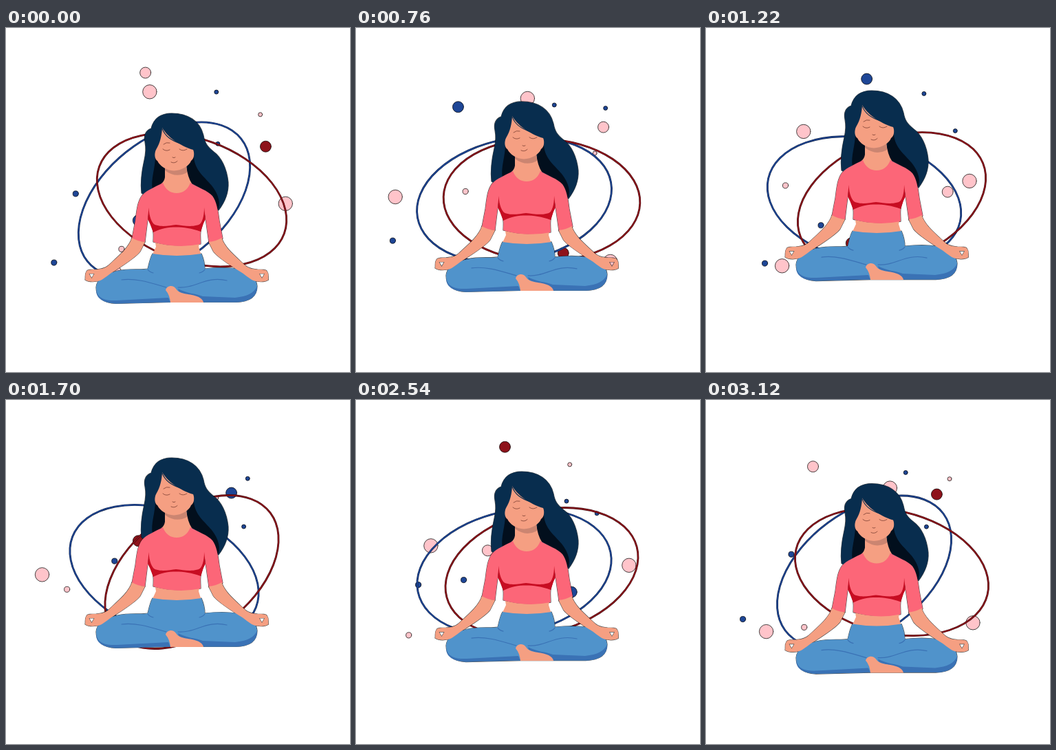
Write an HTML page with a canvas that moves like this. It is 500 px wide and 500 px high and loops after 3.14 s.

```html
<!DOCTYPE html>
<html lang="en">
<head>
<meta charset="utf-8">
<title>Meditation</title>
<style>
html, body { margin: 0; width: 100%; height: 100%; overflow: hidden; background: #fff; }
canvas { display: block; width: 500px; height: 500px; }
</style>
</head>
<body>
<canvas id="c" width="500" height="500"></canvas>
<script>
const ctx = document.getElementById('c').getContext('2d');
const LOOP = 3140, PERIOD = 3400, TAU = Math.PI * 2, DEG = Math.PI / 180;
const SKIN = '#f59f82', HAIR = '#082d4e', SHIRT = '#fc6678', CRIMSON = '#c70d22';
const JEANS = '#5093cb', DENIM = '#3a72b5', PINK = '#ffc4ca', BLUE = '#1e4696', RED = '#8e131b';

// Orbit knots: phase in ms, x, y
const orbit = [
  [0, 192, 280], [250, 191, 219], [320, 192, 205], [760, 148, 115], [830, 155, 97],
  [1110, 202, 65], [1220, 233, 74], [1700, 327, 135], [1870, 359, 144], [2020, 377, 172],
  [2140, 377, 210], [2330, 351, 238], [2540, 313, 279], [2780, 301, 327], [2900, 277, 347],
  [3120, 224, 328], [3240, 211, 313]
];
const N = orbit.length;

function knot(i) {
  const k = orbit[(i + N) % N];
  return [k[0] + Math.floor(i / N) * PERIOD, k[1], k[2]];
}

function slope(i, axis) {
  const a = knot(i - 1), b = knot(i), c = knot(i + 1);
  const h0 = b[0] - a[0], h1 = c[0] - b[0];
  return ((b[axis] - a[axis]) / h0 * h1 + (c[axis] - b[axis]) / h1 * h0) / (h0 + h1);
}

function orbitAt(phase) {
  const p = ((phase % PERIOD) + PERIOD) % PERIOD;
  let i = N - 1;
  while (orbit[i][0] > p) i--;
  const a = knot(i), b = knot(i + 1), h = b[0] - a[0], u = (p - a[0]) / h;
  const u2 = u * u, u3 = u2 * u;
  return [1, 2].map(k =>
    (2 * u3 - 3 * u2 + 1) * a[k] + (u3 - 2 * u2 + u) * h * slope(i, k) +
    (3 * u2 - 2 * u3) * b[k] + (u3 - u2) * h * slope(i + 1, k));
}

// Each group follows the same orbit, placed by anchor, scale, angle and flip
const lags = [0, 1380, 2290];
const groups = [
  { x: 148.4, y: 115, s: 1, a: 0, flip: 1, r: 8, fills: [BLUE, RED, PINK] },
  { x: 288.2, y: 112, s: 0.35, a: -4.4, flip: 1, r: 3, fills: [BLUE, PINK, BLUE] },
  { x: 369.4, y: 339.6, s: 1.247, a: 251, flip: -1, r: 10.2, fills: [PINK, PINK, PINK] },
  { x: 53.4, y: 309, s: 0.488, a: 20.2, flip: -1, r: 4.1, fills: [BLUE, PINK, BLUE] }
];

function drawDots(t) {
  for (const g of groups) {
    const cos = Math.cos(g.a * DEG) * g.s, sin = Math.sin(g.a * DEG) * g.s;
    g.fills.forEach((fill, i) => {
      const [px, py] = orbitAt(t - lags[i]);
      const dx = px - 148, dy = (py - 115) * g.flip;
      ctx.beginPath();
      ctx.arc(g.x + dx * cos - dy * sin, g.y + dx * sin + dy * cos, g.r, 0, TAU);
      ctx.fillStyle = fill;
      ctx.fill();
      ctx.strokeStyle = 'rgba(0,0,0,.8)';
      ctx.lineWidth = 0.9;
      ctx.stroke();
    });
  }
}

const wave = (t, peak) => Math.cos((t - peak) / PERIOD * TAU);

function drawRing(x, angle, color, edge) {
  ctx.beginPath();
  ctx.ellipse(x, 250, 142.9, 89, angle * DEG, 0, TAU);
  ctx.strokeStyle = edge;
  ctx.lineWidth = 2.8;
  ctx.stroke();
  ctx.strokeStyle = color;
  ctx.lineWidth = 1.7;
  ctx.stroke();
}

const P = d => new Path2D(d);
const hair = P('M241 124C222 124 214 134 211 146C203 149 200 156 202 166C204 176 203 183 201 192C198 205 195 222 197 240L215 250L300 262L309 265C318 253 324 240 323 224C321 204 313 188 302 180C292 172 289 167 287 156C282 135 264 124 241 124Z');
const hairShade = P('M271 180C263 192 260 208 267 224L290 237C300 244 304 255 308 265C312 256 310 243 299 229C287 215 275 207 273 188ZM217 187C217 204 210 220 213 235L233 226L231 204Z');
const neck = P('M231 200L231 217Q230 223 226 226Q236 243 249 242Q262 241 270 226Q264 217 262 200Z');
const neckShade = P('M231 200L231 207Q247 219 263 210L262 200Z');
const face = P('M227 145C226.500 156 224 167 218.500 176C215 182 216 191 220 193C224 201 233 207 244 207.500C255 207 266 201 269 193C274 190 274 181 272 177C258 173 237 162 227 145Z');
const strand = P('M227 146C231 158 241 164 254 168');
const features = P('M228 176Q232.500 180 238 177M252 176Q257 180 263 176M229 169Q233 165.500 238 167M242 188Q244 189.500 246 188M240 195Q245 197.500 249 193.500');
const torso = P('M228 225C217 231 204 236 198 243C191 252 190 265 188 280L183 306Q191 311 202 311L207 270L211 285C216 297 214 303 214 311Q248 321 283 314C283 303 281 298 286 284L289 270L295 312Q306 311 315 306L310 280C308 264 306 252 300 244C293 236 279 232 268 225Q262 240 248 240Q234 240 228 225Z');
const bust = P('M211 283C222 291 237 287 247 286C259 287 274 291 286 283L283 296C270 291 258 289.500 247 289.500C236 289.500 226 291 214 297Z');
const armpit = P('M207.500 261C208 275 212 283 217 287L214 297L209 284L206 278ZM288 261C288 275 285 283 280 287L283 296L287 284L290 278Z');
const belly = P('M217 312Q248 320 281 313L280 318L284 331Q248 338 212 331L218 318Z');
const arm = P('M183 305C179 319 163 332 149 345C142 351 136 350 131 351C124 351 118 351 117 354C114 358 116 362 115 366C121 370 131 369 137 367C144 364 150 357 158 353C172 344 190 332 195 325L202 311Q191 310 183 305ZM120.500 357L128.500 357L124.500 364Z');
const jeans = P('M213 328Q248 334 284 328C287 335 289 343 289 350C306 348 326 348 341 351C355 355 364 364 365 375C365 391 354 398 334 398.500L286 398.500L239 398.500L160 400.500C140 399.500 131 391 131 377C132 364 145 357 162 353C180 349 195 352 206 350C208 343 209 335 213 328Z');
const jeansShade = P('M131 381C134 394 145 396.500 161 396L236 392L239 398.500L160 400.500C141 399.500 131 393 131 381ZM250 379C263 386 276 386 286 390L333 392C351 390 361 385 365 375C366 389 355 398.500 334 398.500L286 398.500C282 388 266 390 251 383Z');
const folds = P('M168 366C190 363 212 371 233 377M250 377C275 379 291 360 321 367M206 351Q209 355 214 356M289 351Q286 355 281 356');
const foot = P('M232 381C234 374 243 373 247 379C254 389 267 385 280 391Q286 394 287 399L239 399Q238 388 232 381Z');

function fill(path, color, rule) {
  ctx.fillStyle = color;
  ctx.fill(path, rule || 'nonzero');
}

function line(path, color, width) {
  ctx.strokeStyle = color;
  ctx.lineWidth = width;
  ctx.stroke(path);
}

function bothArms(draw) {
  draw();
  ctx.save();
  ctx.translate(496.500, 0);
  ctx.scale(-1, 1);
  draw();
  ctx.restore();
}

function drawWoman() {
  const edge = 'rgba(0,0,0,.7)';
  [hair, torso, jeans].forEach(p => line(p, edge, 1.2));
  bothArms(() => line(arm, edge, 1.2));
  fill(hair, HAIR);
  fill(hairShade, '#020f1d');
  fill(neck, SKIN);
  fill(neckShade, '#cb8571');
  fill(face, SKIN);
  line(strand, HAIR, 1.1);
  line(features, '#8a4a3c', 0.9);
  fill(belly, SKIN);
  fill(torso, SHIRT);
  fill(armpit, CRIMSON);
  fill(bust, CRIMSON);
  fill(jeans, JEANS);
  fill(jeansShade, DENIM);
  line(folds, DENIM, 1.2);
  fill(foot, SKIN);
  bothArms(() => fill(arm, SKIN, 'evenodd'));
}

function draw(t) {
  ctx.fillStyle = '#fff';
  ctx.fillRect(0, 0, 500, 500);
  drawDots(t);
  drawRing(230, -8.8 + 30 * wave(t, 1640), BLUE, '#0c1f45');
  drawRing(270, -8.5 - 29 * wave(t, 1810), RED, '#3f080c');
  ctx.save();
  ctx.translate(0, -20 - 20 * wave(t, 1690));
  drawWoman();
  ctx.restore();
}

ctx.lineCap = ctx.lineJoin = 'round';
const start = performance.now();
function tick(now) {
  draw(Math.max(0, now - start) % LOOP);
  requestAnimationFrame(tick);
}
draw(0);
requestAnimationFrame(tick);
</script>
</body>
</html>
```
